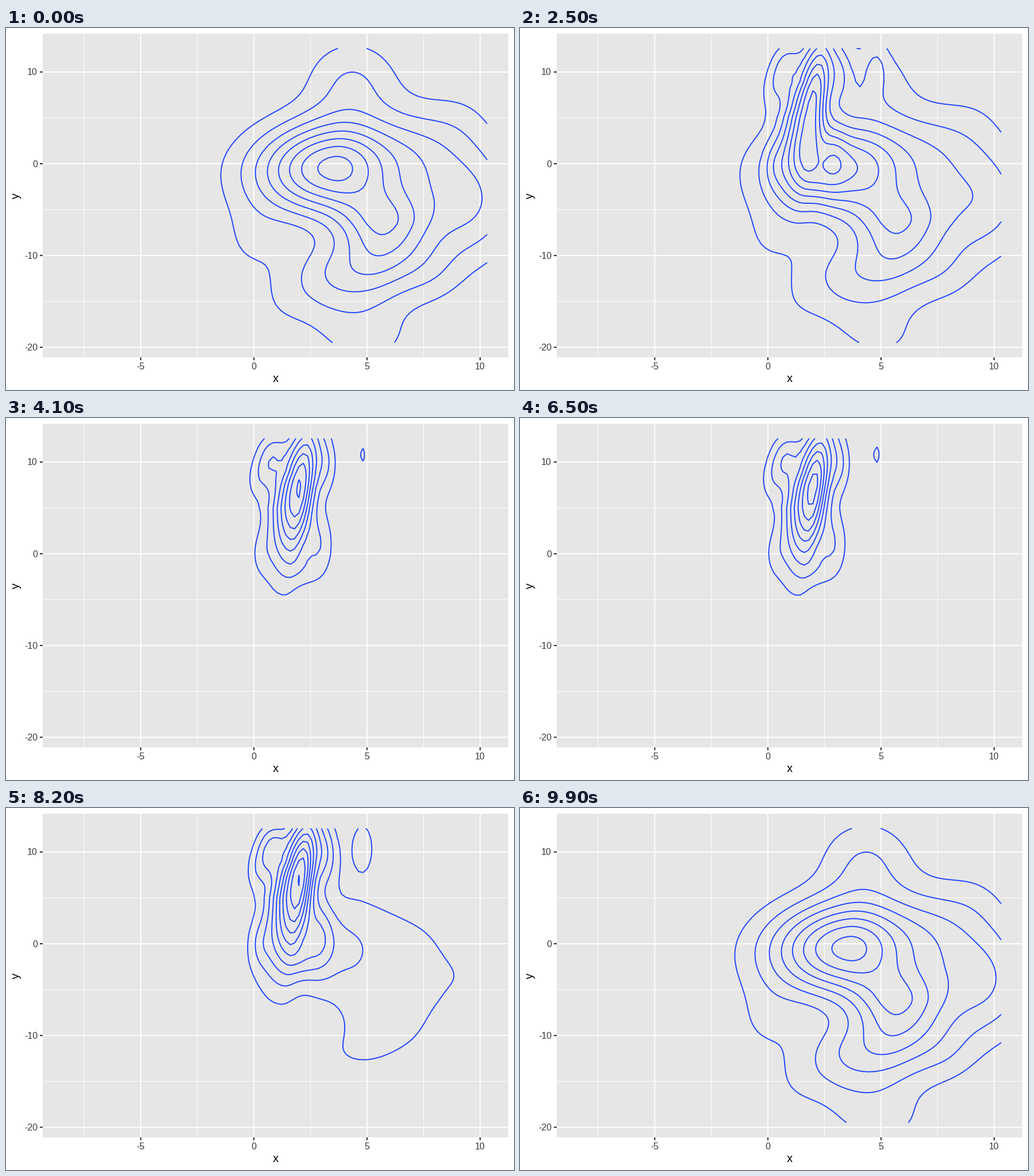
A matplotlib script for the animation above (10 s loop, 885 by 632 pixels).

```python
import numpy as np
import matplotlib.pyplot as plt
from matplotlib.animation import FuncAnimation
from matplotlib.patches import Rectangle

W, H, DPI = 885, 632, 100
FRAMES, INTERVAL = 100, 100
LEFT, TOP, RIGHT, BOTTOM = 64, 10, 875, 575
PX = 72 / DPI  # one pixel in points
THICK, THIN = 1.94 * PX, 0.97 * PX
PANEL, BLUE, TICK, LABEL = "#e6e6e6", "#2247ff", "#242424", "#3b3b3b"


def to_x(v):
    return 431.8 + 39.42 * v


def to_y(v):
    return 237 - 16.02 * v


GX, GY = np.meshgrid(to_x(np.linspace(-8.41, 10.31, 100)),
                     to_y(np.linspace(-19.5, 12.57, 100)))


def bump(x, y, height, sx, sy, lean=0, tilt=0):
    """Gaussian hill in pixels; a width pair gives each side its own spread."""
    dx = GX - x - lean * (GY - y)
    dy = GY - y - tilt * (GX - x)
    left, right = sx if isinstance(sx, tuple) else (sx, sx)
    up, down = sy if isinstance(sy, tuple) else (sy, sy)
    u = dx / np.where(dx < 0, left, right)
    v = dy / np.where(dy < 0, up, down)
    return height * np.exp(-(u * u + v * v) / 2)


# Broad density: a main hill, a lower lobe and the spurs around them.
WIDE = (bump(570, 243, 8.25, (95, 75), (57, 59), tilt=-0.06)
        + bump(660, 345, 5.1, (54, 60), (46, 66))
        + bump(575, 435, 2.7, (64, 74), (45, 54))
        + bump(808, 300, 3, 60, 75)
        + bump(715, 225, 2.1, 55, 60)
        + bump(603, 92, 1.95, 58, 52)
        + bump(630, 545, 1.1, 65, 40)
        + bump(425, 375, 0.87, 40, 45)
        + bump(745, 430, 0.8, 40, 40)
        + bump(790, 160, 0.6, 45, 45)
        + bump(480, 480, 0.5, 35, 35))

# Narrow density: a leaning ridge, its shoulders and one stray hill.
ridge_left = np.clip(21 + 0.13 * (GY - 95), 21, 29)
TALL = (bump(511, 121, 42.3, (ridge_left, 18.5), (75, 91), lean=-0.145)
        + bump(460, 82, 14, 18, 30)
        + bump(545, 220, 9.8, 18, 45)
        + bump(557, 80, 9.3, 14, 38)
        + bump(621, 64, 5.5, 13, 31)
        + bump(435, 115, 5, 14, 28)
        + bump(472, 48, 4.5, 16, 18)
        + bump(443, 238, 4, 12, 28)
        + bump(518, 268, 4, 16, 22))


def ease(p):
    p = min(max(p, 0), 1)
    return 4 * p ** 3 if p < 0.5 else 1 - 4 * (1 - p) ** 3


def levels(peak):
    """Round steps giving about ten levels."""
    step = 1 if peak < 14 else 2 if peak < 28 else 5
    return np.arange(step, peak, step)


fig = plt.figure(figsize=(W / DPI, H / DPI), dpi=DPI, facecolor="white")
ax = fig.add_axes([0, 0, 1, 1])
ax.set_xlim(0, W)
ax.set_ylim(H, 0)
ax.axis("off")


def line(xs, ys, width, color="white"):
    ax.plot(xs, ys, color=color, lw=width, zorder=1, snap=False,
            solid_capstyle="butt")


def text(x, y, s, size, color, ha="center", rotation=0):
    ax.text(x, y, s, fontsize=size * PX, color=color, ha=ha, va="baseline",
            rotation=rotation, rotation_mode="anchor", family="Liberation Sans")


ax.add_patch(Rectangle((LEFT, TOP), RIGHT - LEFT, BOTTOM - TOP,
                       color=PANEL, lw=0, zorder=0))
for v in (-7.5, -2.5, 2.5, 7.5):
    line([to_x(v)] * 2, [TOP, BOTTOM], THIN)
for v in (5, -5, -15):
    line([LEFT, RIGHT], [to_y(v)] * 2, THIN)
for v in (-5, 0, 5, 10):
    line([to_x(v)] * 2, [TOP, BOTTOM], THICK)
    line([to_x(v)] * 2, [BOTTOM, BOTTOM + 5], THICK, TICK)
    text(to_x(v), 595.5, str(v), 16, LABEL)
for v in (10, 0, -10, -20):
    line([LEFT, RIGHT], [to_y(v)] * 2, THICK)
    line([LEFT - 5, LEFT], [to_y(v)] * 2, THICK, TICK)
    text(55, to_y(v) + 5.7, str(v), 16, LABEL, ha="right")
text((LEFT + RIGHT) / 2, 618.5, "x", 20, "black")
text(23, (TOP + BOTTOM) / 2, "y", 20, "black", rotation=90)

drawn = []


def draw(i):
    while drawn:
        drawn.pop().remove()
    t = ease((i - 12) / 37) - ease((i - 64) / 35)
    z = (1 - t) * WIDE + t * TALL
    drawn.append(ax.contour(GX, GY, z, levels=levels(z.max()), colors=[BLUE],
                            linewidths=THICK, zorder=3))
    return drawn


anim = FuncAnimation(fig, draw, frames=FRAMES, interval=INTERVAL,
                     init_func=lambda: [], repeat=True, repeat_delay=0,
                     blit=False)
plt.show()
```
